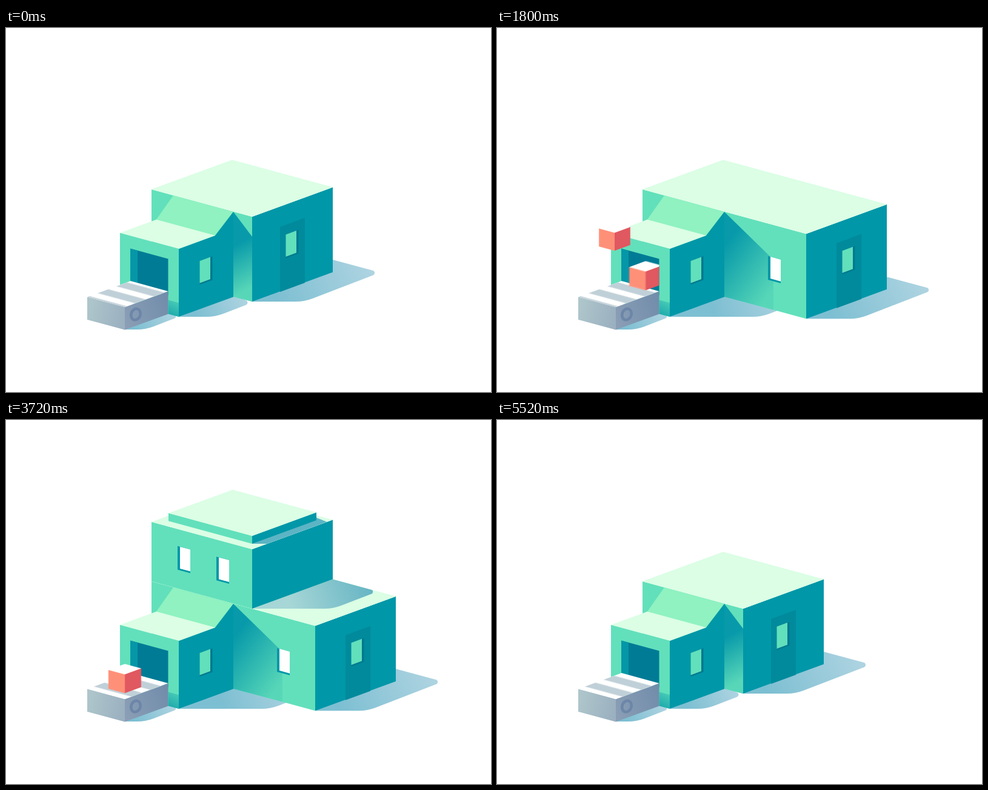
Write an HTML page with a canvas that moves like this. It is 800 px wide and 600 px high and loops after 5.55 s.

```html
<!DOCTYPE html>
<html lang="en">
<head>
<meta charset="utf-8">
<title>Cube factory</title>
<style>
html, body { margin: 0; width: 100%; height: 100%; overflow: hidden; background: #fff; }
canvas { display: block; }
</style>
</head>
<body>
<canvas id="stage" width="800" height="600"></canvas>
<script>
const stage = document.getElementById('stage').getContext('2d');
const layer = document.createElement('canvas');
layer.width = 800;
layer.height = 600;
const soft = layer.getContext('2d');
let pen = stage;

const STEP = 30, LOOP = 185;                  // ms per step, steps per loop
const L = .271, R = .365, SUN = .385;         // slopes of left walls, right walls, shadow edges
const ROOF = '#dbfee5', WALL = '#62e0bb', DARK = '#0097a8', DEEP = '#008a9c', FRAME = '#00788f';

const clamp = x => Math.max(0, Math.min(1, x));
const smooth = x => x * x * (3 - 2 * x);
const ramp = (t, start, length = 15) => smooth(clamp((t - start) / length));

function poly(fill, ...points) {
  pen.beginPath();
  for (const [x, y] of points) pen.lineTo(x, y);
  pen.closePath();
  pen.fillStyle = fill;
  pen.fill();
}
function fade(x0, y0, x1, y1, from, to) {
  const g = pen.createLinearGradient(x0, y0, x1, y1);
  g.addColorStop(0, from);
  g.addColorStop(1, to);
  return g;
}

// Faces start at their top corner (x, y): left walls run left, right walls run right
const leftFace = (fill, x, y, a, h) =>
  poly(fill, [x, y], [x - a, y - L * a], [x - a, y - L * a + h], [x, y + h]);
const rightFace = (fill, x, y, b, h) =>
  poly(fill, [x, y], [x + b, y - R * b], [x + b, y - R * b + h], [x, y + h]);
const topFace = (fill, x, y, a, b) =>
  poly(fill, [x, y], [x - a, y - L * a], [x - a + b, y - L * a - R * b], [x + b, y - R * b]);

function block(x, y, a, b, h, top = ROOF, left = WALL, right = DARK) {
  leftFace(left, x, y, a, h);
  rightFace(right, x, y, b, h);
  topFace(top, x, y, a, b);
}
function leftWindow(x, y) {
  leftFace(DARK, x, y, 21, 39);
  leftFace('#fff', x, y, 17, 36);
}
function rightWindow(x, y) {
  rightFace(FRAME, x, y, 21, 39);
  rightFace(WALL, x, y, 17.5, 36.5);
}
function inside(x, y, a, b, draw) {
  pen.save();
  topFace('transparent', x, y, a, b);
  pen.clip();
  draw();
  pen.restore();
}

// Shadow from corner (x, y) to the tip (tx, ty) and back to (bx, by)
function shadow(x, y, tx, ty, bx, by, round, near = '#7dbfd2', far = '#b4d6e3') {
  const kx = tx - (y - ty) / SUN;
  pen.fillStyle = fade((x + kx) / 2, y, tx, by, near, far);
  pen.beginPath();
  pen.moveTo(x, y);
  pen.arcTo(kx, y, tx, ty, 75 * round);
  pen.arcTo(tx, ty, bx, by, 4 * round);
  pen.lineTo(bx, by);
  pen.fill();
}

// Averages samples over half a step for motion blur
function smear(t, draw, samples = 8) {
  soft.clearRect(0, 0, 800, 600);
  soft.globalCompositeOperation = 'lighter';
  soft.globalAlpha = 1 / samples;
  pen = soft;
  for (let i = 0; i < samples; i++) draw(t + (i + .5) / samples / 2 - .25);
  pen = stage;
  pen.drawImage(layer, 0, 0);
}

function house(w) {
  const x = 406 + 104 * w, y = 311 + 104 * L * w;
  shadow(x, y + 140, x + 211, y + 92, x + 133, y + 71, 1);
  shadow(285, 476, 405 + 91 * w, 453, 375, 440, 1);
  shadow(196, 497, 285, 476, 268, 465, 1);

  block(x, y, x - 240, 133, 140);
  const sx = 406 + 50 * w, sy = 344 + 38 * w;
  poly(fade(375, 360, sx + 5, 425, '#089aaa', '#58d7b8'),
    [375, 303], [sx, sy], [sx, 451 + 50 * L * w], [375, 443]);
  leftWindow(x - 42, y + 42.5);
  const door = 46 + 4 * w;
  rightFace(DEEP, x + door, y + 17 - R * 4 * w, 41, 107);
  rightWindow(x + door + 9.5, y + 29.5 - R * 4 * w);
  topFace(ROOF, x, y, x - 240, 133);
}

function tower(w, h) {
  if (h <= 0) return;
  const rise = 98 * h, y = 311 - rise, reach = 75 * Math.sqrt(h);
  inside(406 + 104 * w, 311 + 104 * L * w, 104 * w, 133, () =>
    shadow(406, 311, 539 + reach, 262 + L * reach, 539, 262, h, '#a6d6d6', '#5fb1c2'));
  block(406, y, 166, 133, rise);
  leftWindow(304, y + .5);
  leftWindow(368, y + 18);

  const slab = 13 * clamp((h - .6) / .4);
  inside(406, y, 166, 133, () =>
    shadow(406, y - 9, 406 + 9.5 * slab, y - 45, 512, y - 52, 0, '#5cb4c4', '#5cb4c4'));
  if (slab) block(406, y - 9 - slab, 138, 106, slab);
}

function porch() {
  poly('#8ff2c0', [276, 276], [375, 303], [345, 343], [247, 317]);
  poly(DARK, [345, 342], [375, 303], [375, 332], [345, 344]);
  rightFace(DARK, 285, 364, 90, 112);
  rightWindow(319.5, 384);
  topFace(ROOF, 285, 364, 97, 60);
  leftFace(WALL, 285, 364, 97, 112);
  leftFace(fade(285, 448, 270, 478, '#4fd0b8', '#16a4ab'), 285, 453, 17.5, 23);
  leftFace('#007b96', 267.5, 380.5, 62.5, 60);
  leftFace('#0597a8', 217, 367, 12, 60);
}

function conveyor(t) {
  block(196, 460, 62, 71.5, 37.5, '#fff',
    fade(134, 460, 196, 475, '#aec6cb', '#9bb0c0'),
    fade(196, 480, 268, 455, '#8a9eb5', '#728dab'));
  inside(196, 460, 62, 71.5, () => smear(t, s => {
    for (let i = -3; i < 4; i++) {
      const along = 17 + 31 * (i + s % 5 / 5);
      topFace('#bfd0d4', 196 + along, 460 - R * along, 62, 17.5);
    }
  }));
  pen.strokeStyle = '#6d86a8';
  pen.lineWidth = 4.6;
  pen.beginPath();
  pen.ellipse(214, 472, 7.6, 9.4, .35, 0, 7);
  pen.stroke();
}

// age: steps since the cube touched the belt
function cube(age) {
  const slide = 51 * (Math.max(age, 0) / 9.6) ** 1.32;
  const size = 1 - (1 - clamp((age + 12) / 5.2)) ** 3;
  const drop = 83 * (1 - ramp(age, -6.2, 5.7));
  const middle = 431 - drop - R * slide;
  block(194 + slide, middle - 11 * size, 27 * size, 27 * size, 31 * size, '#fff', '#ff927b', '#dc5661');
}

function cubes(t) {
  pen.save();
  pen.beginPath();
  pen.rect(0, 0, 267.5, 600);                 // the porch pillar hides the rest
  pen.clip();
  for (let k = 0; k < 8; k++) {
    const age = t - 14 - 18.2 * k;
    if (age > -12 && age < 18) smear(age, cube);
  }
  pen.restore();
}

function draw(now) {
  const t = Math.floor(now / STEP) % LOOP;
  const wing = ramp(t, 37) - ramp(t, 163);
  const height = ramp(t, 85) - ramp(t, 161);

  pen.clearRect(0, 0, 800, 600);
  house(wing);
  tower(wing, height);
  porch();
  conveyor(t);
  cubes(t);
}

const start = performance.now();
function tick() {
  draw(performance.now() - start);
  requestAnimationFrame(tick);
}
tick();
</script>
</body>
</html>
```
